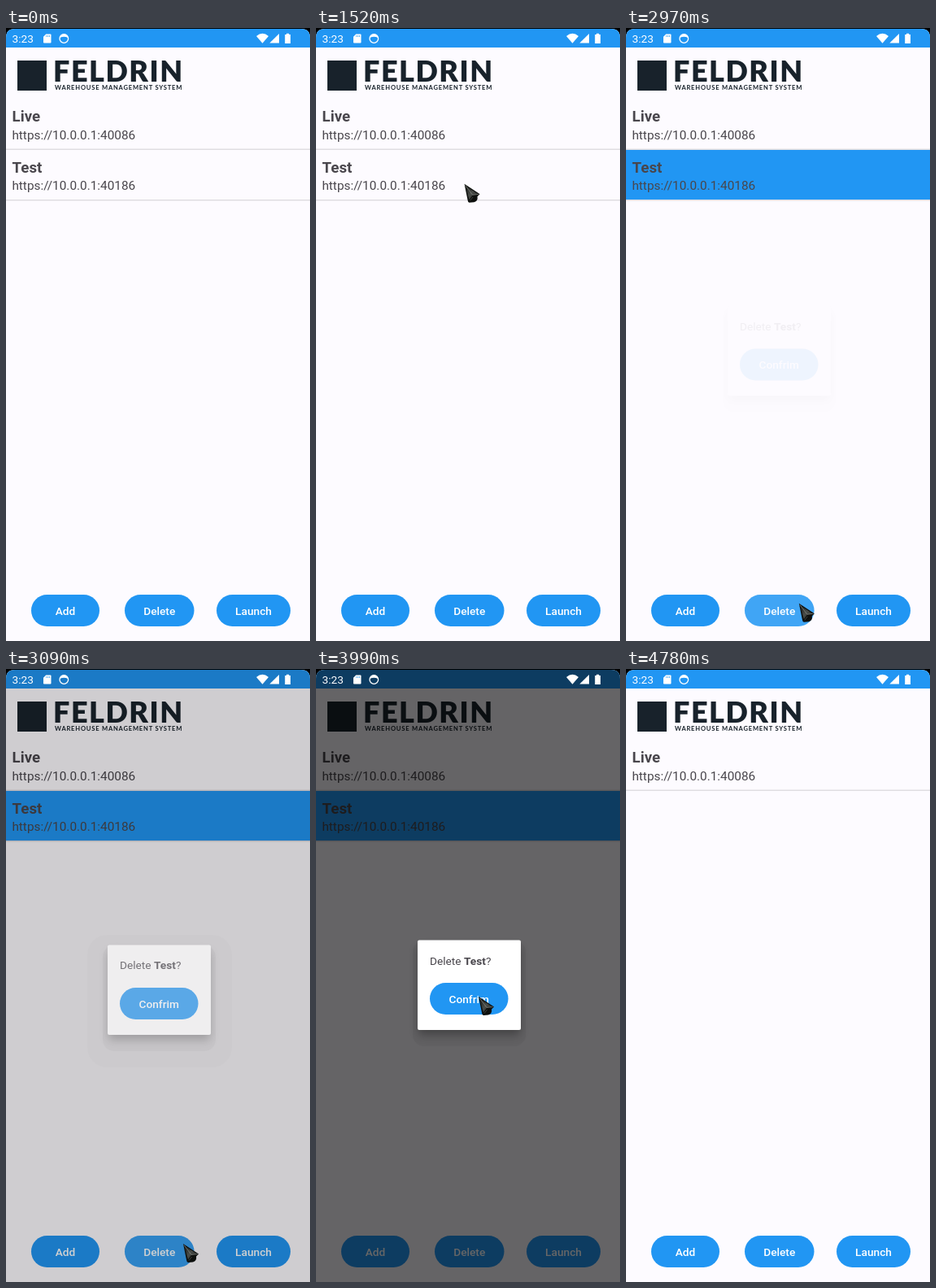
These frames come from a looping animation (374 px wide and 754 px high, 6.39 s). An HTML page:

```html
<!DOCTYPE html>
<html lang="en">
<head>
<meta charset="utf-8">
<title>Delete a connection</title>
<style>
  html, body { margin: 0; width: 100%; height: 100%; overflow: hidden; background: #000; }
  svg { display: block; width: 100%; height: 100%; font-family: Roboto, sans-serif; }
  .ink { fill: #49464c; }
  .name { font-size: 18.7px; font-weight: 700; }
  .url { font-size: 15.35px; }
  .label { font-size: 13.7px; font-weight: 500; fill: #fff; text-anchor: middle; }
  .brand { font-family: Lato, sans-serif; fill: #18222b; }
</style>
</head>
<body>
<svg viewBox="0 0 374 754">
  <defs>
    <clipPath id="screen"><path d="M0 754V12Q0 1 11 1H363Q374 1 374 12V754Z"/></clipPath>
    <filter id="soft" x="-40%" y="-40%" width="180%" height="180%"><feGaussianBlur stdDeviation="6"/></filter>
    <linearGradient id="face" x1="0" y1="0" x2="1" y2="1">
      <stop offset="0" stop-color="#101210"/>
      <stop offset=".5" stop-color="#4a4d49"/>
      <stop offset="1" stop-color="#151715"/>
    </linearGradient>
  </defs>

  <g clip-path="url(#screen)">
    <rect width="374" height="754" fill="#fdfbff"/>
    <rect width="374" height="24" fill="#2196f3"/>

    <rect x="14" y="40" width="36" height="37" fill="#18222b"/>
    <text class="brand" x="58" y="66" font-size="36" font-weight="900" letter-spacing="1.5">FELDRIN</text>
    <text class="brand" x="60" y="76.2" font-size="7.6" font-weight="700" letter-spacing=".78">WAREHOUSE MANAGEMENT SYSTEM</text>

    <g id="rows"></g>
    <g id="buttons"></g>
    <rect id="ripple" x="146" y="697" width="85.5" height="39" rx="19.5" fill="#fff"/>
    <rect id="dim" width="374" height="754"/>

    <g fill="#fff">
      <text x="7.5" y="18" font-size="13.7">3:23</text>
      <path d="M49.2 7.5H54.6Q55.5 7.5 55.5 8.4V17.6Q55.5 18.5 54.6 18.5H46.9Q46 18.5 46 17.6V10.7Z"/>
      <path d="M49.7 9v2M51.6 9v2M53.5 9v2" stroke="#2196f3" stroke-width=".7"/>
      <circle cx="71.3" cy="13" r="5.3" fill="none" stroke="#fff" stroke-width="1.3"/>
      <path d="M66.2 12Q67 7.5 71.3 7.5T76.4 12Q73.5 10.8 71.3 10.8T66.2 12Z"/>
      <path d="M308 10Q315.5 3.6 323 10L315.5 18.7Z"/>
      <path d="M324.3 18.5L336 7V18.5Z"/>
      <path d="M345 8V6.8H348.2V8H350V19H343.2V8Z"/>
    </g>

    <g id="dialog">
      <rect id="halo" x="100" y="321" width="178" height="163" rx="24"/>
      <rect x="119" y="334" width="139" height="130" rx="14" opacity=".045"/>
      <rect x="126" y="342" width="125" height="108" rx="4" opacity=".3" filter="url(#soft)"/>
      <rect x="125" y="333.5" width="127" height="110.5" rx="2" fill="#fff"/>
      <text class="ink" x="140" y="363.5" font-size="13.7">Delete <tspan font-weight="700">Test</tspan>?</text>
      <g id="confirm"></g>
    </g>

    <g id="cursor">
      <path d="M0 0L19 12.5L16 15.5Q17 21 12 22.5L6 23Q4.4 22.6 4.2 20.5Z" fill="#0d0f0d"/>
      <path d="M1.2 2.2L17 12.6L10.2 13.6L6 19.5Z" fill="url(#face)"/>
      <path d="M1 1.5L10 13.4L17.6 12.6" fill="none" stroke="#8b8e89" stroke-width=".7"/>
      <path d="M7 20.5L10.6 16" stroke="#3d403c" stroke-width="1"/>
    </g>
  </g>
</svg>
<script>
const LOOP = 6390, START = 1110, STEP = 130.9;
const $ = id => document.getElementById(id);
const clamp = v => Math.min(1, Math.max(0, v));
const smooth = v => (v = clamp(v), v * v * (3 - 2 * v));
const mix = (a, b, p) => a + (b - a) * p;

const row = (id, y, name, url) => `
  <g id="${id}">
    <rect class="fill" y="${y}" width="374" height="61" fill="#2196f3" opacity="0"/>
    <rect y="${y + 61}" width="374" height="1.5" fill="#dfdde1"/>
    <text class="ink name" x="7.6" y="${y + 27.7}">${name}</text>
    <text class="ink url" x="7.4" y="${y + 49.1}">${url}</text>
  </g>`;

const button = (x, y, w, label) => `
  <rect x="${x}" y="${y}" width="${w}" height="39" rx="19.5" fill="#2196f3"/>
  <text class="label" x="${x + w / 2}" y="${y + 24.8}">${label}</text>`;

$("rows").innerHTML =
  row("live", 87.5, "Live", "https://10.0.0.1:40086") +
  row("test", 150, "Test", "https://10.0.0.1:40186");
$("buttons").innerHTML =
  button(31, 697, 84, "Add") + button(146, 697, 85.5, "Delete") + button(259, 697, 91, "Launch");
$("confirm").innerHTML = button(140, 386, 96.5, "Confrim");

const testFill = document.querySelector("#test .fill");

// Key beats in steps after START.
const SELECT = 4, PRESS = 14, CONFIRM = 25, GONE = 28;

// Pointer stops: step, x, y and how far the way there bows to the right.
const stops = [
  [0, 336, 239, 0], [1, 239, 219, 0], [2, 183, 192, 0], [6, 180, 191, 0],
  [7, 223, 307, 0], [10, 200, 667, 70], [12, 198, 710, 0], [15, 218, 707, 0],
  [22, 200, 403, 80], [24, 200, 403, 0], [25, 200, 403, 0], [27, 296, 431, 0]
];

function pointerAt(k) {
  const i = stops.findIndex(s => s[0] >= k);
  const b = stops.at(i), a = stops[i - 1] || b;
  const p = smooth((k - a[0]) / (b[0] - a[0] || 1));
  return [mix(a[1], b[1], p) + b[3] * Math.sin(Math.PI * p), mix(a[2], b[2], p)];
}

const set = (id, name, value) => $(id).setAttribute(name, value);

function draw(t) {
  const k = Math.floor((t - START) / STEP);

  const [x, y] = pointerAt(k);
  set("cursor", "transform", `translate(${x} ${y})`);
  set("cursor", "opacity", k >= 0 && k < GONE ? 1 : 0);

  const enter = clamp((k - PRESS + .1) / 3);
  const show = smooth(enter);
  const hide = clamp((k - CONFIRM + 1) * .76);
  set("dim", "opacity", .6 * show * (1 - hide));
  set("dialog", "opacity", clamp(enter * 1.83) * (1 - hide));
  set("dialog", "transform", `translate(0 ${8.6 * (1 - show - hide)})`);
  set("halo", "opacity", .028 * (1 - show));
  set("ripple", "opacity", k >= PRESS ? .14 * (1 - show) : 0);

  set("test", "opacity", k < CONFIRM ? 1 : 0);
  testFill.setAttribute("opacity", k >= SELECT ? 1 : 0);
}

const start = performance.now();
function tick() {
  draw((performance.now() - start) % LOOP);
  requestAnimationFrame(tick);
}
tick();
</script>
</body>
</html>
```
